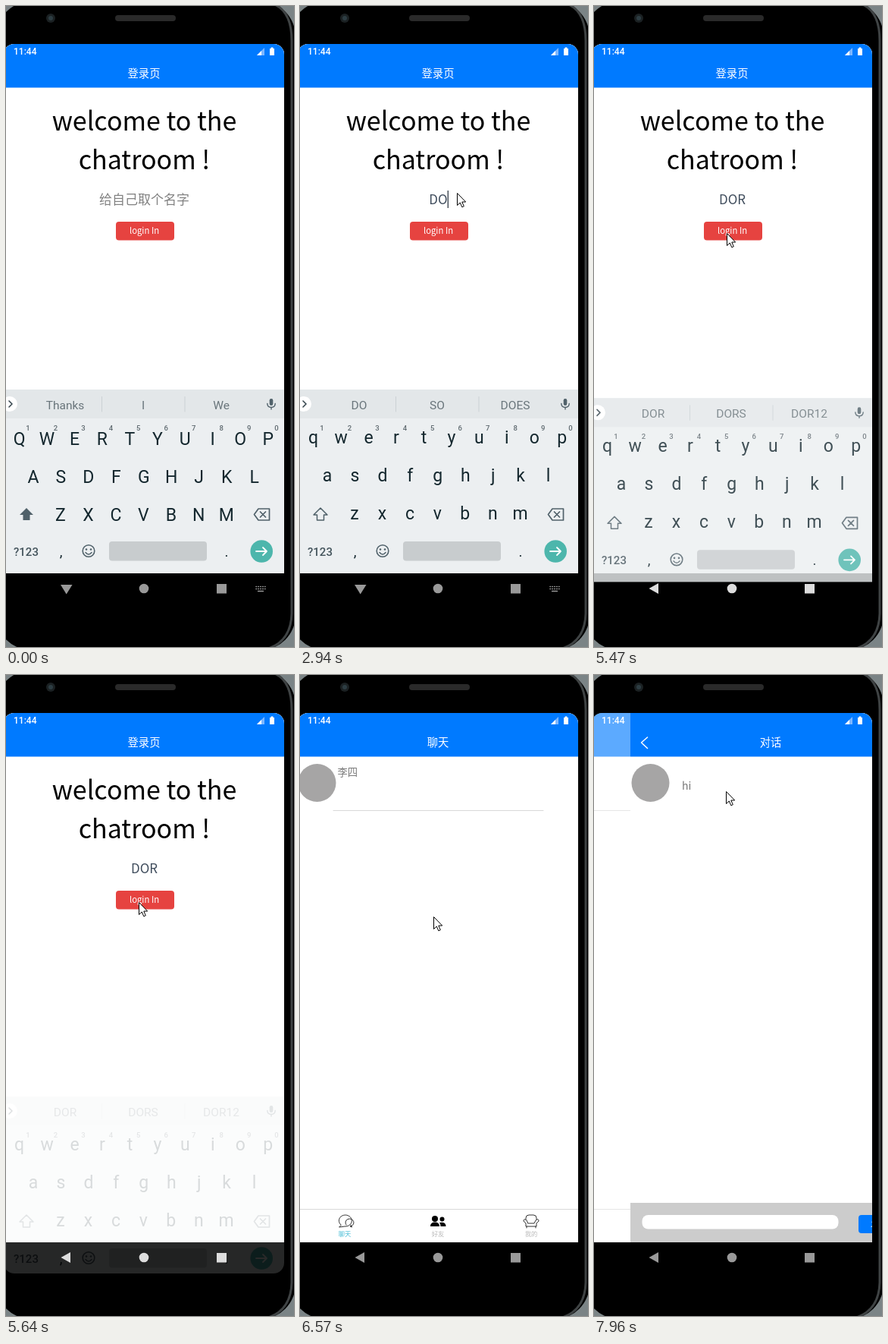
Recreate the animation shown at these times as an HTML page. Size 380 by 844 pixels, loop 8 s.

```html
<!DOCTYPE html>
<html lang="zh-CN">
<head>
<meta charset="utf-8">
<title>Chatroom login</title>
<style>
  html, body { margin: 0; height: 100%; overflow: hidden; background: #000; }
  svg { display: block; width: 100vw; height: 100vh; }
  text { font-family: "Noto Sans CJK SC", "Noto Sans CJK", sans-serif; text-anchor: middle; white-space: pre; }
  .rb { font-family: Roboto, sans-serif; }
  .md { font-weight: 500; }
  .left { text-anchor: start; }
  .line { fill: none; stroke-linecap: round; stroke-linejoin: round; }
</style>
</head>
<body>
<svg id="stage" viewBox="0 0 380 844" xmlns="http://www.w3.org/2000/svg"></svg>
<script>
const LOOP = 8000, MID = 182.5, WIDTH = 370, PITCH = 36.45, INK = '#14272e', GREY = '#50616a';
const $ = id => document.getElementById(id);

const text = (x, y, size, fill, str, cls = '', id = '') =>
  `<text x="${x}" y="${y}" font-size="${size}" fill="${fill}" class="${cls}" id="${id}">${str}</text>`;
const rect = (x, y, w, h, fill, r = 0, more = '') =>
  `<rect x="${x}" y="${y}" width="${w}" height="${h}" rx="${r}" fill="${fill}" ${more}/>`;
const disc = (x, y, r, fill, more = '') => `<circle cx="${x}" cy="${y}" r="${r}" fill="${fill}" ${more}/>`;
const shape = (d, fill, more = '') => `<path d="${d}" fill="${fill}" ${more}/>`;
const line = (d, color, w = 1, more = '') =>
  `<path class="line" d="${d}" stroke="${color}" stroke-width="${w}" ${more}/>`;
const group = (id, ...parts) => `<g id="${id}">${parts.join('')}</g>`;

// Blank page with a blue header
const page = title =>
  rect(-3, 50, WIDTH, 697, '#fff') + rect(-3, 50, WIDTH, 57.5, '#007aff') +
  text(182, 93.5, 14.3, '#fff', title);

const ROWS = ['QWERTYUIOP', 'ASDFGHJKL', 'ZXCVBNM'];
const ARROW_UP = 'M27 661 L36 670 H31.5 V677 H22.5 V670 H18 Z';
const letters = (rows, lift) => [17.6, 36, 72].map((x, r) =>
  [...rows[r]].map((c, i) => text(x + PITCH * i, 578 + 50 * r - lift, 23, INK, c, 'rb')).join('')).join('');

const phone =
  rect(0, 0, 380, 844, '#7b8486') +
  rect(-13, -6, 395, 854, '#000', 46) +
  line('M352 -3 Q377 6 377 46 V800 Q376 836 346 846', '#3f4344', 3) +
  disc(59, 16, 6, '#1b2123') + disc(59, 16, 3, '#2d3d43') +
  rect(144, 12, 80, 8, '#2a2a2a', 4);

const login = group('login', page('登录页'),
  text(MID, 164.3, 34, '#000', 'welcome to the'),
  text(MID, 215, 34, '#000', 'chatroom !'),
  text(MID, 260.5, 17, '#808080', '给自己取个名字', '', 'field'),
  rect(0, 243, 1.2, 23, '#222c38', 0, 'id="caret"'),
  rect(145, 284, 77, 24.5, '#e64340', 4, 'id="button"'),
  text(MID, 300, 11.3, '#fff', 'login In', '', 'label'));

const chat = group('chat', page('聊天'),
  disc(22.5, 142, 25, '#a6a5a5'),
  text(49.5, 133, 13.3, '#777', '李四', 'left'),
  line('M44 178.5 H321 M-3 703.5 H367', '#d8d8d8'),
  line('M54 724 A8.5 7.5 0 1 1 59 726 L52 727 Z M61 724 A5.5 5 0 1 1 66 726 L68.5 727 L67 724', '#333'),
  disc(178, 716, 4, '#000') + disc(187.5, 716.5, 3, '#000'),
  shape('M172 726 Q172 720.5 178 720.5 Q184 720.5 184 726 Z M185.5 726 Q185.5 722.5 184 721 Q192.5 719.5 192.5 726 Z', '#000'),
  line('M298 717 V715 Q298 711 302 711 H308 Q312 711 312 715 V717 M299 718 Q295 715 295 719 L298 722 V726 H312 V722 L315 719 Q315 715 311 718 L309 722 H301 Z M299 726 V728 M311 726 V728', '#333'),
  text(59, 739, 8.3, '#45bcd6', '聊天'),
  text(182, 739, 8.3, '#bbb', '好友'),
  text(305, 739, 8.3, '#bbb', '我的'));

const dialog = group('dialog', page('对话'),
  line('M19.5 82 L11.5 89 L19.5 96.5', '#fff', 1.5),
  disc(23.5, 142, 25, '#a6a5a5'),
  text(65, 151, 14, '#777', 'hi', 'left'),
  rect(-3, 695, WIDTH, 52, '#ccc'),
  rect(12.5, 711, 259, 18.5, '#fff', 8),
  rect(298, 711, 55, 24, '#007aff', 4),
  text(325.5, 727, 11.6, '#fff', '发送'));

const status =
  text(10, 64, 12, '#fff', '11:44', 'rb md left') +
  shape('M341 55 V65 H331 Z', '#7db7ff') + shape('M337 59 V65 H331 Z', '#fff') +
  shape('M348 56 H349.5 V54.5 H352.5 V56 H354 V65 H348 Z', '#fff');

const nav = rect(-3, 747, WIDTH, 41, '#000') + group('keysIcon',
  line('M330 764.5 H342 M330 767.5 H342', '#999', 1.6, 'stroke-dasharray="0.5 2.4"'),
  line('M332.5 770.5 H339.5', '#999', 1.3));

const navIcons = group('navIcons',
  '<path id="back"/>', '<circle cx="182" cy="767" r="6.3"/>', '<rect x="278" y="761" width="13" height="12.5"/>');

const keyboard = group('keyboard',
  rect(-3, 505, WIDTH, 242, '#eceff1'), rect(-3, 505, WIDTH, 38, '#e3e7e9'),
  disc(5, 524, 10, '#fff'), line('M4 520 L8 524 L4 528', '#37474f', 1.6),
  line('M126.5 514.5 V534 M236 514.5 V534', '#cbd1d4'),
  [78, 181, 284].map((x, i) => text(x, 530.5, 15.5, '#69757b', '', 'rb', 'hint' + i)).join(''),
  rect(347.7, 517, 4.6, 9, GREY, 2.3),
  line('M344.8 523.5 Q345 528.5 350 528.5 Q355 528.5 355.2 523.5 M350 528.5 V531', GREY, 1.4),
  [...'1234567890'].map((c, i) => text(29 + PITCH * i, 558.5, 9.5, '#5f6a70', c, 'rb md')).join(''),
  group('upper', letters(ROWS, 0), shape(ARROW_UP, GREY)),
  group('lower', letters(ROWS.map(r => r.toLowerCase()), 2), line(ARROW_UP, GREY, 1.5)),
  line('M333 662 H347.5 V677 H333 L327.5 669.5 Z M335.5 666 L342.5 673 M342.5 666 L335.5 673', GREY, 1.7),
  text(26.5, 723.5, 15, '#44545c', '?123', 'rb md'),
  text(72.5, 725, 19, INK, ',', 'rb'), text(291, 725, 19, INK, '.', 'rb'),
  disc(109, 717.5, 7.8, 'none', `stroke="${GREY}" stroke-width="1.6"`),
  disc(106, 715.5, 1.3, GREY), disc(112, 715.5, 1.3, GREY), line('M105 719.5 Q109 724.5 113 719.5', GREY, 1.5),
  rect(136, 705, 129, 25.5, '#c8ccce', 4),
  disc(337.2, 718, 14.8, '#4db6ac'), line('M330 718 H344 M339 713 L344 718 L339 723', '#fff', 1.8));

const pointer = group('pointer',
  disc(0, 0, 12, '#ff0', 'id="click" fill-opacity=".47"'),
  shape('M.5 .5 V16.5 L4.3 13 L6.8 18.8 L9.3 17.7 L6.8 12 H11.7 Z', '#fff', 'stroke="#000"'));

$('stage').innerHTML =
  `<clipPath id="screen">${rect(-3, 50, WIDTH, 738, '#000', 14)}</clipPath>` + phone +
  `<g clip-path="url(#screen)">${rect(-3, 50, WIDTH, 697, '#fff')}${login}${chat}${dialog}${status}${nav}${keyboard}${navIcons}</g>` + pointer;

// The picture refreshes only at these times: single, or [first, last, count]
const ticks = [0, [140, 910, 11], 980, 1150, 1300, 1380, 1760, 2240, 2460, 2940, 3240, 3700,
  [4160, 4400, 4], 4700, 4780, 5010, 5240, [5470, 5640, 3], [5710, 5940, 4], [6570, 7030, 7],
  7260, 7410, [7790, 7960, 3]]
  .flatMap(k => k.length ? Array.from({ length: k[2] }, (_, i) => k[0] + (k[1] - k[0]) * i / (k[2] - 1)) : k);

// Pointer path: time, x, y
const path = [[140, 293, 834], [525, 247, 500], [910, 207, 247], [980, 207, 246], [4160, 207, 246],
  [4400, 174, 299], [4700, 174, 299], [4780, 175, 299], [5710, 175, 299], [5940, 177, 339],
  [6490, 177, 339], [6570, 176, 318], [7030, 174, 153], [LOOP, 174, 153]];

const typing = [
  [0, '', ['Thanks', 'I', 'We']],
  [2460, 'D', ['D', 'I', 'DO']],
  [2940, 'DO', ['DO', 'SO', 'DOES']],
  [3240, 'DOR', ['DOR', 'DORS', 'DOR12']]];
const caretOn = [[280, 780], [1300, 1760], [2240, 3700], [4160, 4700], [5240, 5470]];
const clicks = [[1150, 1380], [5010, 5470], [7260, 7410]];

const clamp = v => Math.max(0, Math.min(1, v));
const within = (t, spans) => spans.some(([a, b]) => t >= a && t < b);
const show = (id, on) => set(id, 'visibility', on ? 'inherit' : 'hidden');
const set = (id, name, v) => $(id).setAttribute(name, v);
const move = (id, x, y = 0) => set(id, 'transform', `translate(${x} ${y})`);

function drawPointer(t) {
  show('pointer', t >= 140);
  const i = Math.max(1, path.findIndex(p => p[0] > t));
  const [a, b] = [path[i - 1], path[i]], k = clamp((t - a[0]) / (b[0] - a[0]));
  move('pointer', Math.round(a[1] + (b[1] - a[1]) * k), Math.round(a[2] + (b[2] - a[2]) * k));
  show('click', within(t, clicks));
}

function drawLogin(t) {
  const [, name, hints] = typing.findLast(s => t >= s[0]);
  $('field').textContent = name || '给自己取个名字';
  set('field', 'fill', name ? '#3f4c5c' : '#808080');
  set('caret', 'x', MID + (name ? $('field').getComputedTextLength() / 2 : 0));
  show('caret', within(t, caretOn));
  hints.forEach((h, i) => $('hint' + i).textContent = h);
  show('upper', !name);
  show('lower', name);
  const pressed = t >= 5240 && t < 5470;
  set('button', 'fill', pressed ? '#ce3c39' : '#e64340');
  set('label', 'opacity', pressed ? .6 : 1);
}

function drawKeyboard(t) {
  const hide = clamp((t - 5420) / 220), hiding = t >= 5470;
  $('keyboard').style.display = t < 5710 ? '' : 'none';
  move('keyboard', 0, 50 * hide);
  set('keyboard', 'opacity', 1 - .84 * hide);
  show('keysIcon', !hiding);
  set('navIcons', 'fill', hiding && t < 5710 ? '#ddd' : '#999');
  set('back', 'd', hiding ? 'M72.5 767 L85 760 V774 Z' : 'M72 762 H87.5 L79.7 774.5 Z');
}

function drawPages(t) {
  const left = (1 - clamp((t - 7750) / 334)) ** 2, done = 1 - left;
  set('chat', 'opacity', clamp((t - 5710) / 230) * (1 - .42 * done));
  move('chat', -.3 * WIDTH * done);
  show('login', t < 5940);
  show('dialog', t >= 7790);
  move('dialog', WIDTH * left);
}

const start = performance.now();
function frame() {
  const time = (performance.now() - start) % LOOP, t = ticks.findLast(k => k <= time + .01);
  drawLogin(t);
  drawKeyboard(t);
  drawPages(t);
  drawPointer(t);
  requestAnimationFrame(frame);
}
frame();
</script>
</body>
</html>
```
